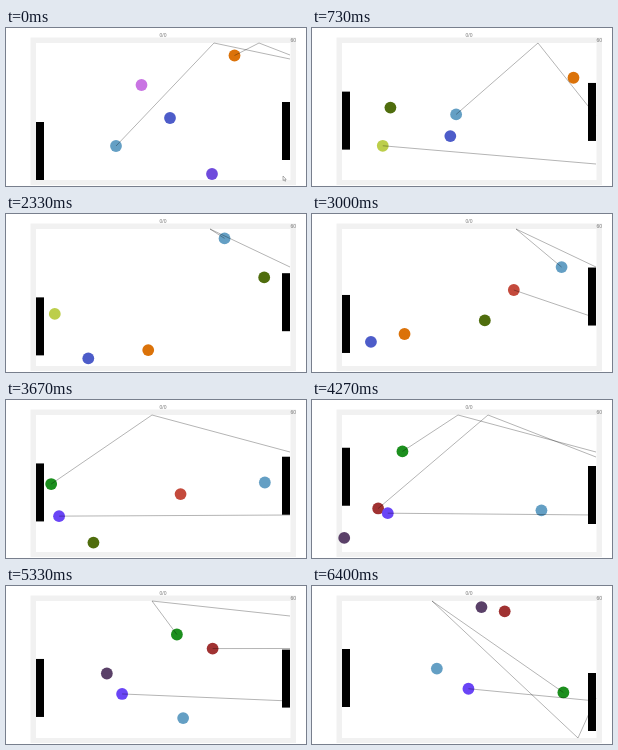
An HTML page that plays this animation: 300x158 px, repeating every 6470 ms.

```html
<!DOCTYPE html>
<html lang="en">
<head>
<meta charset="utf-8">
<title>Paddle game</title>
<style>
  html, body { margin: 0; width: 100%; height: 100%; overflow: hidden; background: #fff; }
  svg { display: block; width: 100vw; height: 100vh; }
  text { font: 5px "Liberation Sans", Arial, sans-serif; fill: #777; }
  polyline { fill: none; stroke: #000; stroke-width: .3; }
</style>
</head>
<body>
<svg viewBox="0 0 300 158">
  <rect x="24.5" y="9.5" width="265.5" height="147.5" fill="#f1f1f1"/>
  <rect x="30" y="15" width="254.5" height="137" fill="#fff"/>
  <text x="157" y="8.6" text-anchor="middle">0/0</text>
  <text x="284.4" y="14">60</text>
  <g id="paddles"></g>
  <g id="balls"></g>
  <g id="aims"></g>
  <path id="cursor" d="M0 0V4.6L1.1 3.7L2 5.4L2.7 5L1.9 3.4H3.2Z" fill="#fff" stroke="#666" stroke-width=".5"/>
</svg>
<script>
const LOOP = 6470, STEP = 66.7;
const TOP = 15, BOTTOM = 152, RADIUS = 5.9, GOAL = 284;
const HIGH = 21, LOW = 146;      // ball centre at the walls
const LEFT = 44, RIGHT = 270;    // ball centre at the paddles
const MISSED = 31;

// Reflect a straight run between the top and bottom walls.
function fold(y) {
  const span = LOW - HIGH, m = (((y - HIGH) % (2 * span)) + 2 * span) % (2 * span);
  return HIGH + (m > span ? 2 * span - m : m);
}

// A ball flies leg by leg; each leg ends where it meets a paddle or the edge.
function makeBall(x, y, legs) {
  let start = 0, colour;
  return legs.map(leg => {
    const { vx, vy, aims = [], edge = vx > 0 ? RIGHT : LEFT } = leg;
    colour = leg.colour || colour;
    const made = { start, x, y, vx, vy, colour, aims };
    const time = (edge - x) / vx;
    start += time * 1000;
    y = fold(y + vy * time);
    x = edge;
    return made;
  });
}

// Aim: [from ms, x of each wall bounce (top first), height at the goal line]
const flights = [
  makeBall(110, 118, [
    { vx: 46.5, vy: -43, colour: '#649fc4',
      aims: [[0, 208, 31], [620, 226, 88], [1521, 226, 53], [2256, 204, 53]] },
    { vx: -49, vy: 46.4 }
  ]),
  makeBall(228.5, 27.5, [
    { vx: 67, vy: -47, colour: '#db7209', aims: [[0, 253, 27]] },
    { vx: -74.5, vy: 53.9 },
    { vx: 75.4, vy: -54.3, colour: '#1c8f1e',
      aims: [[0, 146, 52], [4828, 146, 30], [5817, 120, 266, 112]] }
  ]),
  makeBall(206, 146, [
    { vx: -258, vy: -42, colour: '#6f4bdc' },
    { vx: 253, vy: -17.5, colour: '#bcce4a', aims: [[0, 136]] },
    { vx: -272, vy: -5 },
    { vx: 243, vy: -36.7, colour: '#c44a3c', aims: [[0, 104]] },
    { vx: -247, vy: 73.4, edge: MISSED },
    { vx: 64.3, vy: 62.4, colour: '#5a4068' }
  ]),
  makeBall(135.5, 57, [
    { vx: -290, vy: 128, colour: '#c974e3', edge: MISSED },
    { vx: 127, vy: -63, colour: '#4f6d0d', aims: [[1521, 217, 25]] },
    { vx: -128, vy: 64.5, edge: 38 },
    { vx: 131.6, vy: -43, colour: '#a03232', aims: [[0, 176, 57], [4828, 62.5]] },
    { vx: -132, vy: -43 }
  ]),
  makeBall(164, 90, [
    { vx: -35, vy: 24.7, colour: '#4d5cc9' },
    { vx: 37.8, vy: -4.9, colour: '#6a45f6', aims: [[0, 115]] }
  ])
];

// Turning points of each paddle's centre: [ms, y]
const paddles = [
  { x: 30, turns: [[0, 123], [300, 123], [733, 92.6], [1600, 115], [3000, 110],
    [4267, 76.7], [5333, 102], [6000, 92]] },
  { x: 276, turns: [[0, 103], [600, 79], [1600, 116], [2240, 89], [3300, 80],
    [4267, 95], [5333, 92.7], [5815, 75], [6400, 116]] }
];

function set(el, attrs) {
  for (const key in attrs) el.setAttribute(key, attrs[key]);
}

function add(id, tag, attrs) {
  const el = document.createElementNS('http://www.w3.org/2000/svg', tag);
  set(el, attrs);
  return document.getElementById(id).appendChild(el);
}

const latest = (list, test) => list.filter(test).pop();

function between(turns, t) {
  const a = latest(turns, p => p[0] <= t), b = turns.find(p => p[0] > t) || a;
  return a[1] + (b[1] - a[1]) * (t - a[0]) / (b[0] - a[0] || 1);
}

function aimLine(x, y, [, ...marks]) {
  const end = marks.pop();
  const walls = marks.map((wx, i) => [wx, i % 2 ? BOTTOM : TOP]);
  return [[x, y], ...walls, [GOAL, end]].join(' ');
}

for (const p of paddles) p.el = add('paddles', 'rect', { x: p.x, width: 8, height: 58 });
const balls = flights.map(legs => ({
  legs,
  dot: add('balls', 'circle', { r: RADIUS }),
  line: add('aims', 'polyline', {})
}));
const cursor = document.getElementById('cursor');

function draw(t) {
  for (const p of paddles) set(p.el, { y: between(p.turns, t) - 29 });
  for (const { legs, dot, line } of balls) {
    const leg = latest(legs, l => l.start <= t);
    const s = (t - leg.start) / 1000;
    const x = leg.x + leg.vx * s, y = fold(leg.y + leg.vy * s);
    const aim = latest(leg.aims, a => a[0] <= t);
    set(dot, { cx: x, cy: y, fill: leg.colour });
    set(line, { points: aim ? aimLine(x, y, aim) : '' });
  }
  set(cursor, {
    transform: `translate(277 ${148 + t / 100})`,
    visibility: t < 130 ? 'visible' : 'hidden'
  });
}

const begun = performance.now();
function tick() {
  const t = (performance.now() - begun) % LOOP;
  draw(Math.floor(t / STEP + .1) * STEP);
  requestAnimationFrame(tick);
}
tick();
</script>
</body>
</html>
```
